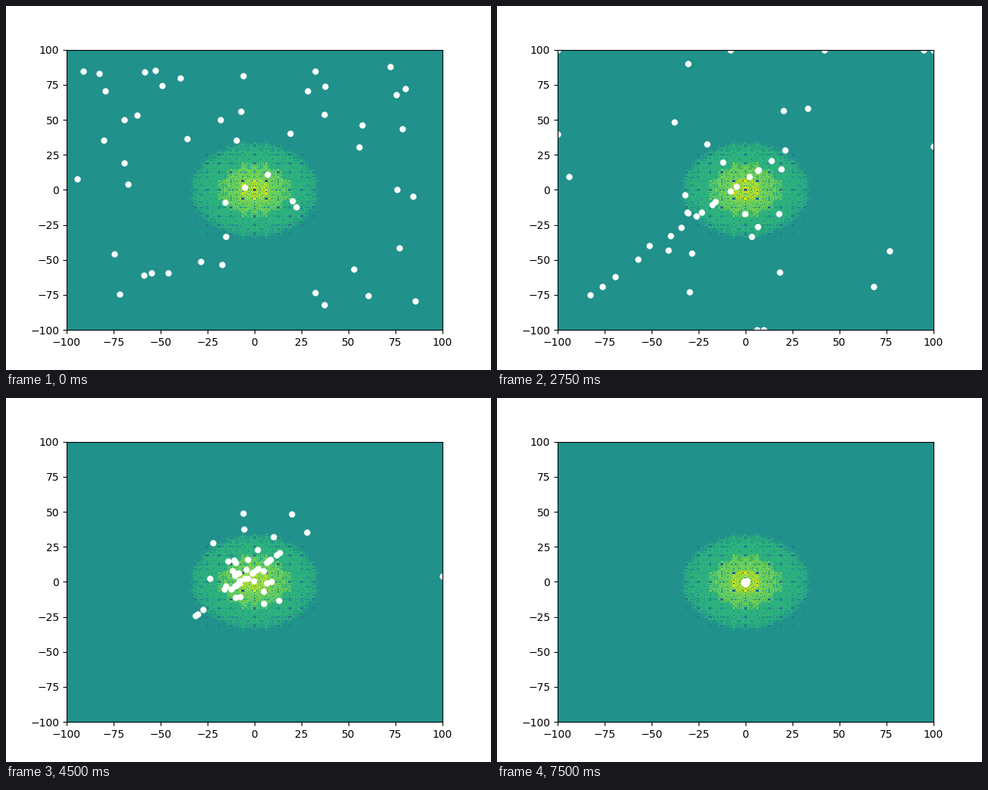
Write a matplotlib script that moves like this. It is 640 by 480 pixels and loops after 7.75 s.

```python
import numpy as np
import matplotlib.pyplot as plt
from matplotlib.animation import FuncAnimation

FRAMES = 31
INTERVAL = 250
SWARM = 50
BOUND = 100
STEP = 0.25
BANDS = 7


def schaffer(x, y):
    """Schaffer N.2 function with its minimum at the centre."""
    return 0.5 + (np.sin(x**2 - y**2)**2 - 0.5) / (1 + 0.001 * (x**2 + y**2))**2


rng = np.random.default_rng(12)
start = rng.uniform(-95, 95, (SWARM, 2))
start[0] = -5.1, 2.1

# Each particle swings around the best point; some share the diagonal through it
size = rng.lognormal(0, 0.9, (SWARM, 2))
phase = rng.uniform(0, 2 * np.pi, (SWARM, 2))
speed = rng.uniform(0.8, 2.2, (SWARM, 2))
on_diagonal = np.arange(SWARM) % 5 < 2


def best(i):
    """Best point known: a local minimum first, then the global one."""
    return np.array([-3.7, 3.7]) if i < 20 else np.array([-0.4, -0.3])


def reach(i):
    """Width of the swarm: constant while searching, then shrinking."""
    return 70 * np.exp(-0.11 * max(0, i - 10)**1.3)


def swarm(i):
    offset = reach(i) * size * np.cos(phase + speed * i)
    offset[on_diagonal, 1] = offset[on_diagonal, 0]
    pull = min(1, i / 2)
    pos = start * (1 - pull) + (best(i) + offset) * pull
    return np.clip(pos, -BOUND, BOUND)


fig, ax = plt.subplots(figsize=(6.4, 4.8), dpi=100)
colors = plt.cm.viridis((np.arange(BANDS) + 0.5) / BANDS)
ax.set_facecolor(colors[BANDS // 2])

# Beyond this grid the surface stays within the middle band
axis = np.arange(-188, 189) * STEP
gx, gy = np.meshgrid(axis, axis)
ax.contourf(gx, gy, schaffer(gx, gy), colors=colors,
            levels=np.arange(BANDS + 1) * 0.15)
dots = ax.scatter(*start.T, s=36, c="white", linewidths=0, zorder=2)
ax.set_xlim(-BOUND, BOUND)
ax.set_ylim(-BOUND, BOUND)


def draw(i):
    dots.set_offsets(swarm(i))
    return dots,


anim = FuncAnimation(fig, draw, frames=FRAMES, interval=INTERVAL,
                     repeat=True, repeat_delay=0, blit=True)
plt.show()
```
